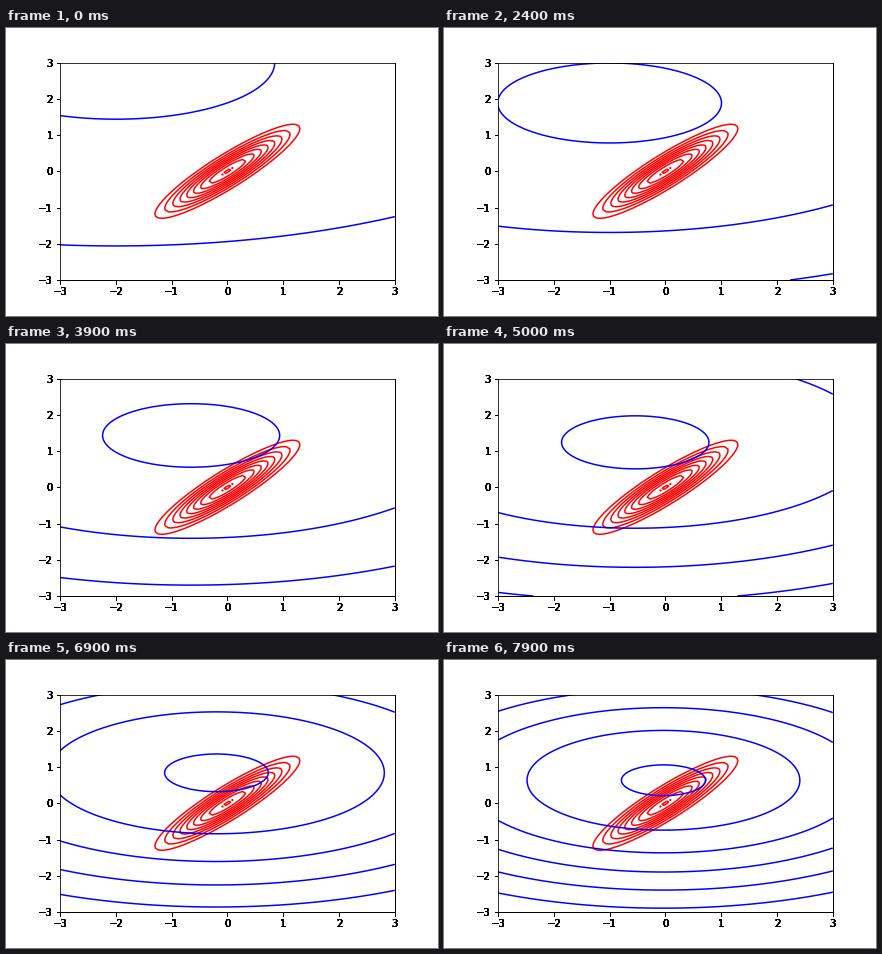
These frames come from a looping animation (432x288 px, 8000 ms). A matplotlib script:

```python
import numpy as np
import matplotlib.pyplot as plt
from matplotlib.animation import FuncAnimation

FRAMES, INTERVAL = 80, 100
LAYERS = 12
LEVELS = np.append(np.arange(0.2, 0.95, 0.1), 0.99)

# A few points on the noisy descent of the mean
STEPS = [0, 9, 24, 39, 50, 61, 79]
MEAN_X = [-2, -1.56, -1, -0.65, -0.54, -0.325, -0.035]
MEAN_Y = [3, 2.5, 1.885, 1.43, 1.24, 1.005, 0.635]

grid = np.linspace(-3, 3, 100)
X, Y = np.meshgrid(grid, grid)


def log_posterior(a, b, wins=20):
    """Two skills with a unit normal prior and equally many wins each."""
    d = a - b
    return (-(a**2 + b**2) / 2
            - wins * (np.logaddexp(0, -d) + np.logaddexp(0, d)))


def log_approx(a, b, t):
    """Factorised Gaussian whose mean and log widths shrink with step t."""
    mx, my = np.interp(t, STEPS, MEAN_X), np.interp(t, STEPS, MEAN_Y)
    sx = np.exp(3.0 - 0.0144 * t - 3.85e-7 * t**3)
    sy = np.exp(2.4 - 0.0143 * t - 3.5e-7 * t**3)
    return -(((a - mx) / sx) ** 2 + ((b - my) / sy) ** 2) / 2


def skill_contour(ax, logp, color):
    z = np.exp(logp - logp.max())
    return ax.contour(X, Y, z, levels=LEVELS, colors=color, linewidths=1.5)


def make_axes(fig, label):
    ax = fig.add_axes([0.125, 0.125, 0.775, 0.755], label=label)
    ax.set(xlim=(-3, 3), ylim=(-3, 3),
           xticks=range(-3, 4), yticks=range(-3, 4))
    return ax


plt.rcParams.update({"font.family": "DejaVu Sans", "font.size": 10})
fig = plt.figure(figsize=(6, 4), dpi=72, facecolor="white")

# Stacked opaque axes darken the antialiased tick labels
ax = [make_axes(fig, f"layer{i}") for i in range(LAYERS)][-1]
skill_contour(ax, log_posterior(X, Y), "red")
current = []


def update(t):
    while current:
        current.pop().remove()
    current.append(skill_contour(ax, log_approx(X, Y, t), "blue"))
    return current


anim = FuncAnimation(fig, update, frames=FRAMES, interval=INTERVAL,
                     init_func=lambda: update(0), repeat=True, repeat_delay=0)
plt.show()
```
